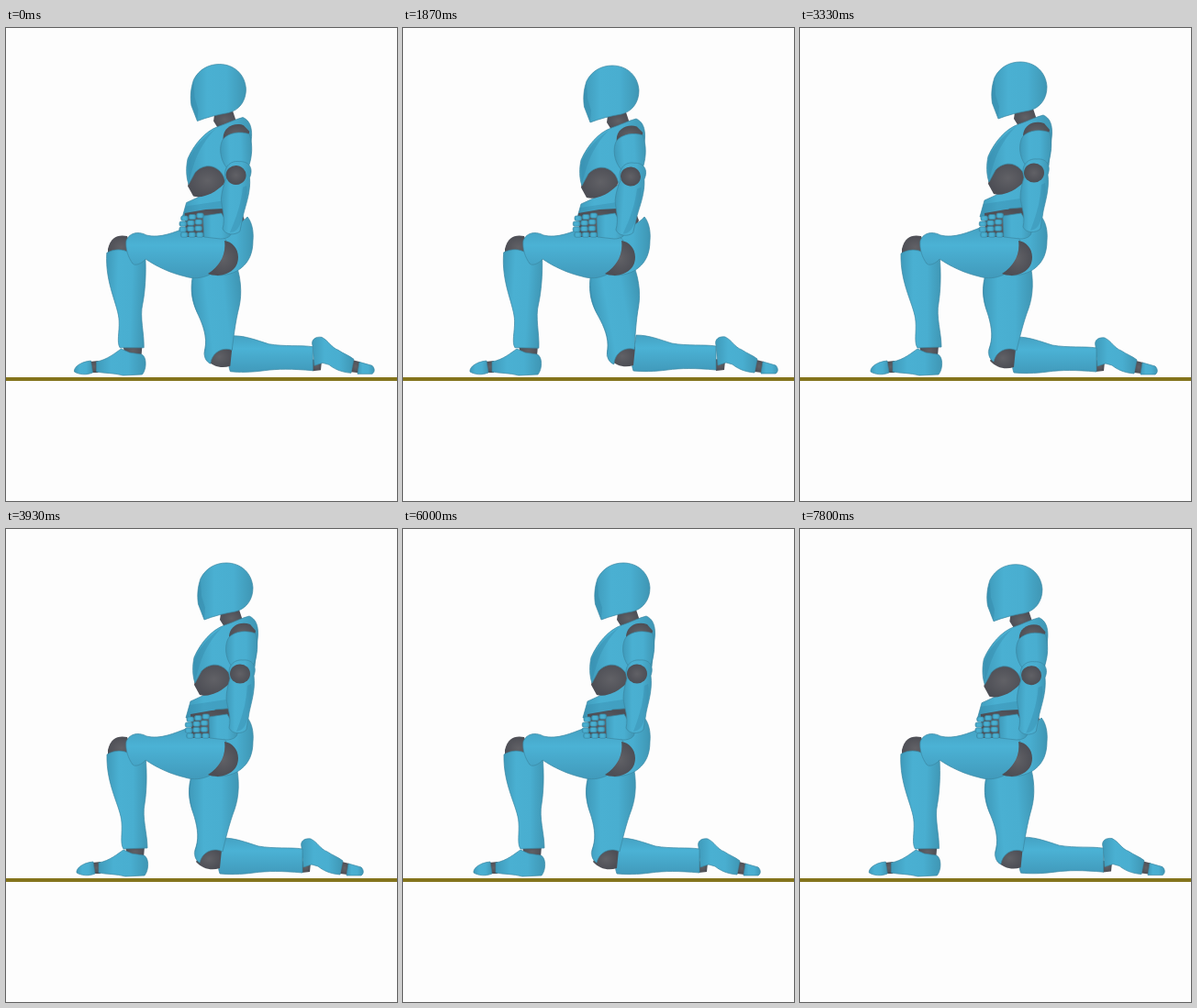
Animation, 426 px wide and 516 px high, one loop 7.87 s. Source, as an HTML page:

```html
<!DOCTYPE html>
<html lang="en">
<head>
<meta charset="utf-8">
<title>Kneeling stretch</title>
<style>
  html, body { margin: 0; width: 100%; height: 100%; overflow: hidden; background: #fdfdfd; }
  svg { display: block; width: 100vw; height: 100vh; }
  .skin { fill: url(#skin); stroke: #3b87a3; stroke-width: .7; stroke-linejoin: round; }
  .limb { fill: url(#limb); stroke: #3b87a3; stroke-width: .7; stroke-linejoin: round; }
  .joint { fill: url(#joint); }
  .shade { fill: #2f7f9f; opacity: .3; }
</style>
</head>
<body>
<svg id="stage" viewBox="0 0 426 516" xmlns="http://www.w3.org/2000/svg">
  <defs>
    <linearGradient id="skin">
      <stop offset="0" stop-color="#3f9aba"/>
      <stop offset=".3" stop-color="#4ab0d2"/>
      <stop offset=".65" stop-color="#49aed0"/>
      <stop offset="1" stop-color="#3f96b4"/>
    </linearGradient>
    <linearGradient id="limb" x1="0" y1="0" x2="0" y2="1">
      <stop offset="0" stop-color="#45a2c3"/>
      <stop offset=".35" stop-color="#4bb2d5"/>
      <stop offset="1" stop-color="#419abb"/>
    </linearGradient>
    <radialGradient id="joint">
      <stop offset="0" stop-color="#616166"/>
      <stop offset="1" stop-color="#4d4e55"/>
    </radialGradient>
  </defs>
  <rect width="426" height="516" fill="#fdfdfd"/>
  <rect y="381" width="426" height="4" fill="#84741c"/>
</svg>
<script>
const NS = "http://www.w3.org/2000/svg";
const stage = document.getElementById("stage");
const LOOP = 7870, FPS = 15;

// Each part: full-lean shift [dx, dy, degrees, pivot x, pivot y], then [class, path] shapes.
const parts = [
  { lean: [19, -1, 0, 0, 0], shapes: [
    ["joint", "M321 362L332 364L331 374L322 375Z"],
    ["joint", "M366 363L374 365L372 377L364 376Z"],
    ["skin", "M322 347C320 340 326 337 332 338C340 342 342 349 350 352C356 356 362 358 367 362L364 377C352 376 345 372 340 368L333 366L324 369Z"],
    ["skin", "M373 365L387 369C390 372 390 376 387 378L371 378Z"]
  ] },
  { lean: [18, -2, 0, 0, 0], shapes: [
    ["limb", "M236 337C250 337 262 342 275 346C292 349 310 347 323 349L323 375C300 373 285 373 270 375C255 377 243 377 233 376C230 368 232 362 234 350Z"],
    ["joint", "M207 363C212 352 226 346 235 350L233 370C224 373 214 371 207 363Z"]
  ] },
  { lean: [0, 0, -10.4, 236, 262], shapes: [
    ["joint", "M216 262L247 262C246 270 240 274 232 274C224 274 218 271 216 262Z"],
    ["skin", "M207 255L250 255C255 273 254 292 249 306C243 322 239 339 236 352C226 347 214 352 211 364C206 361 204 355 207 347C211 335 208 322 204 310C198 293 197 278 207 255Z"],
    ["shade", "M204 268C198 284 201 302 206 316C210 329 210 340 207 350L204 355L207 346C210 334 207 320 203 308C198 294 198 280 204 268Z"]
  ] },
  { lean: [-7, 4, 0, 0, 0], shapes: [
    ["joint", "M222 192L258 190L264 206L256 220L222 216Z"],
    ["skin", "M201 188L212 183L243 166L256 172L261 194L228 197L217 206L196 206Z"],
    ["shade", "M200 192L240 186L256 190L261 194L228 197L217 206L196 206Z"]
  ] },
  { lean: [0, 0, 0, 0, 0], shapes: [
    ["skin", "M225 222C245 220 257 213 263 206C268 212 270 222 269 232C269 245 265 255 256 262C250 267 240 270 230 270L215 260Z"]
  ] },
  { lean: [-11, 4, 0, 0, 0], shapes: [
    ["joint", "M205 170C208 150 226 143 242 147L248 160L244 168C235 177 222 184 211 181Z"],
    ["joint", "M234 92L254 88L258 100L238 107L233 99Z"],
    ["skin", "M238 105C247 102 257 97 265 95C272 98 275 105 274.500 116L271 150L246 168C245 150 226 141 213 155L206 168C203 160 203 149 205 140C212 124 224 110 238 105Z"],
    ["shade", "M236 107C219 118 206 136 205 146L206 165L211 148C216 132 226 116 236 107Z"]
  ] },
  { lean: [-12, 4, 0, 0, 0], shapes: [
    ["skin", "M216 99L209.500 82C208 72 209 63 212 54C218 42 229 37 240 37C256 37 268 48 269 64C269 77 262 87 250 90C238 92 226 95 216 99Z"],
    ["shade", "M212 56C209 64 208 73 210 82L216 98L217 86L213 73Z"]
  ] },
  { lean: [-4, 0, 0, 0, 0], shapes: [
    ["joint", "M130 346L151 346L150 358L132 357Z"],
    ["joint", "M94 364L103 363L103 376L95 376Z"],
    ["skin", "M101 364C113 362 122 354 128 350L137 354L150 356C156 358 156 372 151 378L130 379C120 376 110 377 101 375Z"],
    ["skin", "M95 363L97 376C90 379 82 378 77 375C76 370 84 364 95 363Z"]
  ] },
  { lean: [0, 0, 0, 0, 0], shapes: [
    ["joint", "M111 241C114 228 122 225 132 227L140 250L111 252Z"]
  ] },
  { lean: [0, 0, 3.2, 130, 240], shapes: [
    ["skin", "M110 246C118 241 128 241 134 245L152 248C154 268 153 288 151 300C148 315 154 332 154 348L128 349C124 343 127 332 126 320C125 303 109 280 110 246Z"]
  ] },
  { lean: [0, 0, 0, 0, 0], shapes: [
    ["limb", "M131 232C135 222 146 222 153 226C168 230 185 222 196 218C215 217 235 224 240 232C241 248 234 260 222 269C214 273 204 274 195 271C178 267 164 260 152 252C148 257 141 260 138 257C133 250 130 241 131 232Z"],
    ["joint", "M238 232C246 233 253 240 253 250C253 262 244 269 231 270C226 270 222 269 220 268C234 259 240 246 238 232Z"]
  ] },
  { id: "hand", lean: [-10, 0, 0, 0, 0], shapes: [
    ["joint", "M201 202L224 198L243 197L243 206L224 228L202 228Z"],
    ["skin", "M221 205L241 202L252 221C253 227 247 230 240 230L222 228Z"]
  ] },
  { lean: [-11, 4, -4, 257, 108], shapes: [
    ["joint", "M243 118C243 105 256 100 266 104L272 111L270 122Z"],
    ["skin", "M243 118C250 111 262 110 272 114C275 126 274 137 270 148L246 150C238 140 238 125 243 118Z"]
  ] },
  { lean: [-7, 4, 4, 255, 158], shapes: [
    ["skin", "M244 163C240 150 248 142 258 143C268 142 274 149 270 160C272 175 267 190 265 200L262 219C257 224 246 224 243 217C246 205 241 195 240 185C240 178 242 170 244 163Z"],
    ["joint", "M244 158A11 10.500 0 0 1 266 158A11 10.500 0 0 1 244 158Z"],
    ["shade", "M263 171C262 188 258 203 251 221C259 220 262 214 264 202C267 191 269 178 267 169Z"]
  ] }
];

function add(parent, tag, attrs) {
  const node = document.createElementNS(NS, tag);
  for (const key in attrs) node.setAttribute(key, attrs[key]);
  return parent.appendChild(node);
}

for (const part of parts) {
  part.node = add(stage, "g", {});
  for (const [kind, d] of part.shapes) add(part.node, "path", { class: kind, d });
}

// Three knuckle segments for each of four fingers
const hand = parts.find(part => part.id === "hand").node;
for (let finger = 0; finger < 4; finger++) {
  const x = 197 - 2 * Math.sin(finger), y = 205 + finger * 6;
  for (let k = 0; k < 3; k++) {
    add(hand, "rect", { class: "skin", x: x + k * 8.5, y: y - k * 1.5 + finger * k * .5,
      width: 7.6, height: 5.2, rx: 1.8 });
  }
}

const ease = u => {
  u = Math.min(1, Math.max(0, u));
  return u * u * (3 - 2 * u);
};

function leanAt(ms) {
  if (ms > 4000) return ease((ms - 7578) / 497);
  return ease((ms + LOOP - 7578) / 497) * (1 - ease((ms - 2370) / 500));
}

function render(ms) {
  const step = Math.floor((ms % LOOP + 4) * FPS / 1000) / FPS * 1000;
  const p = leanAt(step);
  for (const { node, lean: [dx, dy, deg, px, py] } of parts) {
    node.setAttribute("transform", `translate(${dx * p} ${dy * p}) rotate(${deg * p} ${px} ${py})`);
  }
}

const start = performance.now();
function tick() {
  render(performance.now() - start);
  requestAnimationFrame(tick);
}
tick();
</script>
</body>
</html>
```
